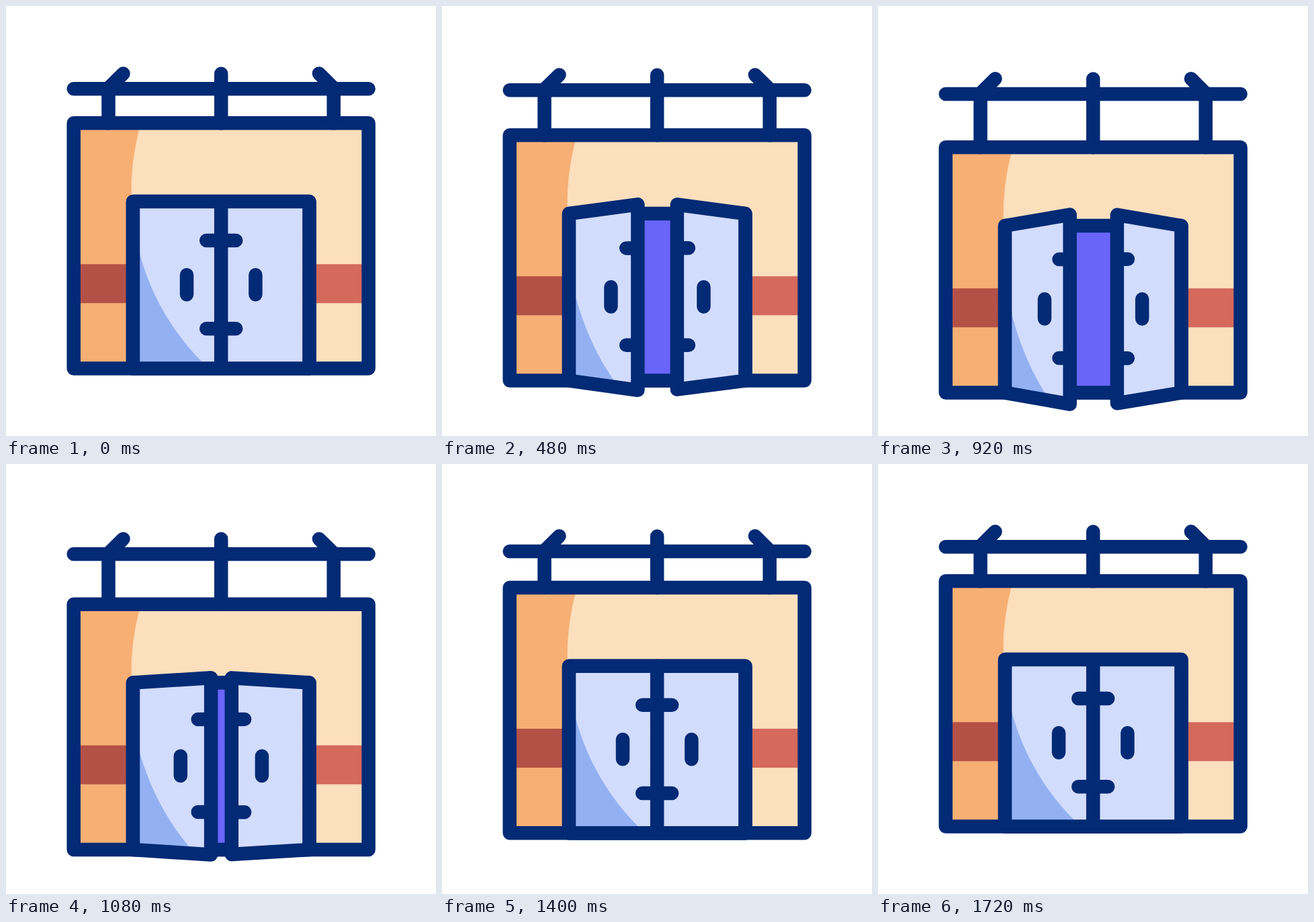
Recreate the animation shown at these times as an HTML page. Size 640 by 640 pixels, loop 1.8 s.

```html
<!DOCTYPE html>
<html lang="en">
<head>
<meta charset="utf-8">
<title>Opening doors</title>
<style>
  html, body { margin: 0; width: 100%; height: 100%; overflow: hidden; background: #fff; }
  svg { display: block; width: 100%; height: 100%; }
  .line { fill: none; stroke: #032a75; stroke-width: 20.5; stroke-linecap: round; stroke-linejoin: round; }
</style>
</head>
<body>
<svg viewBox="0 0 640 640">
  <defs>
    <clipPath id="wallClip"><path d="M100.7 174.3H539.6V539.6H100.7Z"/></clipPath>
    <clipPath id="doorClip"><path id="doorMask"/></clipPath>
  </defs>
  <g id="house">
    <path fill="#f7af74" d="M100.7 174.3H539.6V539.6H100.7Z"/>
    <circle cx="547.6" cy="275" r="361" fill="#fcdfbd" clip-path="url(#wallClip)"/>
    <path fill="#b45147" d="M100.7 384.3H189V442.3H100.7Z"/>
    <path fill="#d4695c" d="M451.5 384.3H539.6V442.3H451.5Z"/>
    <path class="line" d="M100.7 174.3H539.6V539.6H100.7Z"/>
    <path class="line" style="fill:#6965f9" d="M189 291H451.5V539.6H189Z"/>
    <path id="leftFill" fill="#93b1f2"/>
    <g clip-path="url(#doorClip)"><ellipse id="glow" cy="275" ry="361" fill="#d2dcfd"/></g>
    <path id="leftLine" class="line"/>
    <g transform="matrix(-1 0 0 1 640.4 0)">
      <path id="rightFill" fill="#d2dcfd"/>
      <path id="rightLine" class="line"/>
    </g>
  </g>
  <path id="posts" class="line"/>
</svg>
<script>
const LOOP = 1800, STEP = 40, HINGE = 189, WIDTH = 131.2;
const $ = id => document.getElementById(id);
const set = (id, attrs) => {
  for (const key in attrs) $(id).setAttribute(key, attrs[key]);
};

const clamp = u => Math.min(1, Math.max(0, u));
const inOut = (u, p) => u < .5 ? (2 * u) ** p / 2 : 1 - (2 - 2 * u) ** p / 2;

// Rises from a to b, then falls back from b to c.
const swing = (t, a, b, c, p) =>
  t < b ? inOut(clamp((t - a) / (b - a)), p) : inOut(clamp((c - t) / (c - b)), p);

const railDrop = t => 14.45 * clamp(t < 1240 ? (t - 60) / 1180 : (1740 - t) / 500) ** 2;

function door(side, d, top, bottom) {
  const edge = HINGE + WIDTH - d;
  const at = x => HINGE + (x - HINGE) * (1 - d / WIDTH);
  const leaf = `M${HINGE} 291L${edge} ${291 - top * d}V${539.6 + bottom * d}L${HINGE} 539.6Z`;
  const bar = y => `M${at(298.2)} ${y}H${edge}`;
  set(side + 'Fill', { d: leaf });
  set(side + 'Line', {
    d: leaf + bar(349 - .23 * d) + bar(480.3 + .22 * d) + `M${at(269)} 400.3V429.5`
  });
  return leaf;
}

function draw(t) {
  const drop = 36 * swing(t, 60, 900, 1740, 2.9);
  const open = swing(t, 100, 730, 1380, 3);
  const d = 38.4 * open;
  const squeeze = 1 - .012 * d;

  set('house', { transform: `translate(0 ${drop})` });
  set('doorMask', { d: door('left', d, .475, .495) });
  door('right', 39.6 * open, .455, .44);
  set('glow', { cx: 199 + (348.6 - .55 * d) * squeeze, rx: 361 * squeeze });

  const rail = railDrop(t), foot = 174.3 + drop;
  const y = v => v + rail;
  set('posts', {
    d: `M100.7 ${y(123.3)}H539.6M320.2 ${y(100.8)}V${foot}` +
       `M174.5 ${y(100.6)}L152.5 ${y(122.3)}V${foot}` +
       `M465.9 ${y(100.6)}L487.7 ${y(122.3)}V${foot}`
  });
}

let start;
function tick(now) {
  start ??= now;
  draw(Math.floor((now - start) % LOOP / STEP) * STEP);
  requestAnimationFrame(tick);
}
draw(0);
requestAnimationFrame(tick);
</script>
</body>
</html>
```
